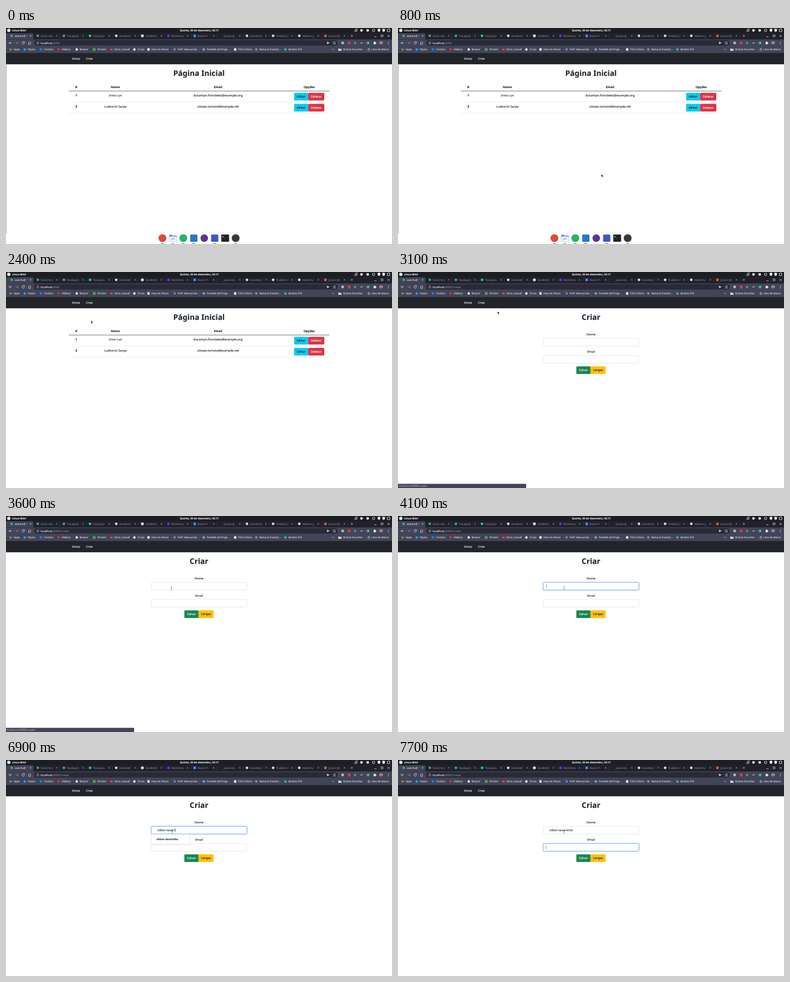
Write an HTML page that moves like this. It is 690 by 388 pixels and loops after 8 s.

```html
<!DOCTYPE html>
<html lang="pt-BR">
<head>
<meta charset="utf-8">
<title>Página Inicial</title>
<style>
html, body { margin: 0; width: 100%; height: 100%; overflow: hidden; background: #fff; }
svg { display: block; width: 100vw; height: 100vh; }
text { font-family: "Noto Sans", "Open Sans", sans-serif; white-space: pre; text-rendering: geometricPrecision; }
</style>
</head>
<body>
<svg id="stage" viewBox="0 0 690 388"></svg>
<script>
const NS = "http://www.w3.org/2000/svg";
const stage = document.getElementById("stage");
const LOOP = 8000;

function el(parent, tag, attrs = {}) {
  const node = document.createElementNS(NS, tag);
  for (const k in attrs) node.setAttribute(k, attrs[k]);
  parent.appendChild(node);
  return node;
}
const group = parent => el(parent, "g");
const rect = (g, x, y, width, height, fill, rx = 0, more = {}) =>
  el(g, "rect", { x, y, width, height, fill, rx, ...more });
const dot = (g, cx, cy, r, fill, more = {}) => el(g, "circle", { cx, cy, r, fill, ...more });
const line = (g, d, stroke, width = 0.7) =>
  el(g, "path", { d, stroke, "stroke-width": width, fill: "none" });
function text(g, str, x, y, size, fill, more = {}) {
  const node = el(g, "text", {
    x, y, "font-size": size, fill, stroke: fill, "stroke-width": 0.1, ...more
  });
  node.textContent = str;
  return node;
}
const MID = { "text-anchor": "middle" };
const BOLD = { "font-weight": 700 };
const show = (node, on) => node.setAttribute("visibility", on ? "visible" : "hidden");
const clamp = v => Math.max(0, Math.min(1, v));

const INK = "#212529", PALE = "#dcdde4", BAR = "#424458", BODY = 5.55;

rect(stage, 0, 0, 690, 388, "#fff");

// Desktop panel
function drawPanel() {
  const g = group(stage);
  rect(g, 0, 0, 690, 9, "#1d1e24");
  dot(g, 5, 4.3, 3, "#e2e2e2");
  text(g, "Linux Mint", 11, 6.1, 4.65, "#eee", BOLD);
  text(g, "Quinta, 30 de dezembro, 02:17", 345.5, 6.1, 4.65, "#eee", { ...MID, ...BOLD });
  line(g, "M624.5 5.8V2.3l3-.7v3.6", "#eee", 0.8);
  dot(g, 624, 5.9, 0.9, "#eee");
  dot(g, 627, 5.3, 0.9, "#eee");
  dot(g, 635.5, 4.3, 2.4, "#eee");
  dot(g, 646.5, 4.3, 2.4, "#eee");
  dot(g, 657, 4.3, 2.2, "none", { stroke: "#eee", "stroke-width": 0.9 });
  el(g, "path", { d: "M664.4 1.8l2.3-.6 2.3.6v2.4q0 2-2.3 3-2.3-1-2.3-3z", fill: "#eee" });
  el(g, "path", { d: "M672.8 1.8l2.3-.6 2.3.6v2.4q0 2-2.3 3-2.3-1-2.3-3z", fill: "#eee" });
  rect(g, 681.4, 2, 4.6, 4.6, "none", 0.8, { stroke: "#eee", "stroke-width": 0.9 });
}

function drawTabs() {
  const g = group(stage);
  const green = "#3da778", white = "#d6d6da";
  const tabs = [
    ["vue-crud -", green], ["Event Han", green], ["Navegaçã", green], ["Papagaio", "#25d366"],
    ["localhost:", white], ["Incidente", white], ["Bootstrap", "#7620d8"], ["Buscor T", "#4285f4"],
    ["Javascrip", ""], ["conversor", white], ["Trabalho r", white], ["redirect y", white],
    ["javascript", "#c65a30"]
  ];
  rect(g, 0, 9, 690, 12, "#20212b");
  el(g, "path", { d: "M0 20.5V11.5q0-2 2-2H47q2 0 2 2V20.5z", fill: BAR });
  tabs.forEach(([name, color], i) => {
    const x = 10 + i * 46.75, on = i === 0;
    if (color) {
      if (i === 5 || i === 6 || i === 7 || i === 12) rect(g, x - 2.4, 11.7, 4.8, 4.8, color, 0.6);
      else dot(g, x, 14.1, 2.4, color);
    }
    text(g, name, x + 5.5, 15.9, 4.6, on ? "#e6e7ec" : "#7d7e88");
    const c = x + 34;
    line(g, `M${c - 1.3} 12.8l2.6 2.6m0-2.6l-2.6 2.6`, on ? "#eee" : "#b4b5bc", 0.6);
    if (!on) line(g, `M${x + 40} 12v5`, "#50515c", 0.4);
  });
  line(g, "M616 14.1h4.4m-2.2-2.2v4.4", "#ccc", 0.6);
  line(g, "M658.5 15.8h4M682 12.5l3.6 3.6m0-3.6l-3.6 3.6", "#ddd", 0.8);
  rect(g, 670.5, 12.5, 3.4, 3.4, "none", 0, { stroke: "#ddd", "stroke-width": 0.7 });
}

let urlPath;
function drawToolbar() {
  const g = group(stage);
  rect(g, 0, 20.5, 690, 24.6, BAR);
  rect(g, 50, 22, 543, 9.6, "#282a36", 4.8);
  line(g, "M10.5 26.8h-5m2.2-2.2l-2.2 2.2 2.2 2.2", PALE, 0.8);
  line(g, "M17 26.8h5m-2.2-2.2l2.2 2.2-2.2 2.2", "#8a8b98", 0.8);
  line(g, "M32.7 25.2a2.3 2.3 0 1 0 .5 2.2m-.2-3.4v1.8h-1.8", PALE, 0.8);
  line(g, "M39.7 26.8l2.5-2.4 2.5 2.4m-4.2-.5v3h3.4v-3", PALE, 0.8);
  dot(g, 56.8, 26.8, 2.1, "none", { stroke: "#ccc", "stroke-width": 0.6 });
  line(g, "M56.8 26.4v1.6m0-2.6v.5", "#ccc", 0.6);
  const url = text(g, "localhost", 62, 28.6, 5, "#eceef2");
  urlPath = el(url, "tspan", { fill: "#9a9ca6", stroke: "none" });
  el(g, "path", { d: "M573.5 24.5l5 2.3-5 2.3.6-2.3z", fill: "#ddd" });
  el(g, "path", {
    d: "M587 24.1l.8 1.8 1.9.2-1.4 1.3.4 1.9-1.7-1-1.7 1 .4-1.9-1.4-1.3 1.9-.2z",
    fill: "none", stroke: "#ddd", "stroke-width": 0.6
  });
  rect(g, 599.5, 24.5, 4.6, 4.6, "#b3b4be", 1);
  rect(g, 611, 24.3, 4.8, 5, "#d23f3f", 1);
  dot(g, 624, 26.8, 2.2, "#777986");
  rect(g, 633, 25.8, 5.2, 2, "#8f909c", 1);
  dot(g, 647.3, 26.8, 2.5, "#41b883");
  rect(g, 657, 25.2, 4, 4, PALE, 0.6);
  dot(g, 659, 24.9, 1, PALE);
  dot(g, 661.2, 27, 1, PALE);
  dot(g, 670.5, 26.8, 3.1, "#b79a86");
  el(g, "path", { d: "M668.4 29.1q2.1-3 4.2 0a3.1 3.1 0 0 1-4.2 0z", fill: "#555a66" });
  dot(g, 670.5, 26, 1.1, "#555a66");
  [24.9, 26.8, 28.7].forEach(y => dot(g, 683.5, y, 0.6, PALE));

  const marks = [
    [14, "Apps", ""], [39, "Pipilar", "#1da1f2"], [68, "Cartazo", "#1f7fd6"],
    [99.5, "Videlux", "#e02f2f"], [132, "Buscor", "#e4e4e6"], [163, "Torrent", "#4caf50"],
    [194, "Docs Laravel", "#e5432f"], [235, "Curso", "#e4e4e6"], [260, "Area do Aluno", "#e4e4e6"],
    [307, "PHP: Manual do...", "#7479b8"], [359, "Padrões de Proje...", "#7ea3c8"],
    [415, "CSS Codoro", "#e4e4e6"], [453, "Remova Fundos...", "#8b8c98"],
    [505, "Bordas CSS", "#2fb6a0"]
  ];
  marks.forEach(([x, name, color], i) => {
    if (color) {
      if (i % 3 === 2) rect(g, x - 7.5, 36.3, 4.4, 4.4, color, 0.5);
      else dot(g, x - 5.5, 38.5, 2.2, color);
    }
    text(g, name, x, 40.2, 4.6, PALE);
  });
  ["#e05a4a", "#e6b93c", "#4aa564"].forEach((c, i) =>
    [0, 1, 2].forEach(j => rect(g, 6 + j * 1.7, 36.2 + i * 1.7, 1.2, 1.2, c)));
  text(g, "»", 583.5, 40.2, 5, PALE);
  el(g, "path", { d: "M594 36.7h2l.8.8h3v3.4H594z", fill: "#d0d1d8" });
  text(g, "Outros favoritos", 602.5, 40.2, 4.6, PALE);
  line(g, "M643.5 36v5", "#666878", 0.4);
  line(g, "M646.5 36.8h4M646.5 38.6h4M646.5 40.4h4", PALE, 0.7);
  text(g, "Lista de leitura", 653, 40.2, 4.6, PALE);
}

function drawNav() {
  rect(stage, 0, 45, 690, 20.2, INK);
  text(stage, "Inicio", 118, 57.4, BODY, "#fff");
  text(stage, "Criar", 143, 57.4, BODY, "#fff");
}

const heading = (g, str) =>
  text(g, str, 345, 86, 13.6, INK, { ...MID, "font-weight": 600 });

function button(g, label, x, y, w, fill, color) {
  rect(g, x, y, w, 13.7, fill, 1.5);
  text(g, label, x + w / 2, y + 8.8, BODY, color, MID);
}

function drawHome() {
  const g = group(stage);
  const cols = [125.5, 195.5, 379, 542];
  heading(g, "Página Inicial");
  ["#", "Nome", "Email", "Opções"].forEach((s, i) =>
    text(g, s, cols[i], 108, 5.5, INK, { ...MID, ...BOLD }));
  line(g, "M112 113.2H578", "#30343a", 0.7);
  [
    ["1", "Irina Lux", "docampo.florisbela@example.org"],
    ["3", "Ludovino Sarpa", "ulisses.tamoio@example.net"]
  ].forEach((row, r) => {
    const y = r * 19.8;
    row.forEach((s, i) =>
      text(g, s, cols[i], 122.8 + y, BODY, INK, i ? MID : { ...MID, ...BOLD }));
    button(g, "Editar", 515, 116.5 + y, 25.4, "#0dcaf0", "#111");
    button(g, "Deletar", 540.2, 116.5 + y, 28.8, "#dc3545", "#fff");
    line(g, `M112 ${133.1 + y}H578`, "#dee2e6", 0.5);
  });
  return g;
}

function field(g, y) {
  const ring = rect(g, 258.6, y - 1, 173, 15.7, "#b9d5fe", 2.4);
  rect(g, 259.6, y, 171, 13.7, "#fff", 1.5, { stroke: "#ced4da", "stroke-width": 0.5 });
  const edge = rect(g, 259.6, y, 171, 13.7, "none", 1.5, { stroke: "#6ba6fb", "stroke-width": 0.7 });
  return level => [ring, edge].forEach(n => n.setAttribute("opacity", level));
}

const FULL = "nilton tavarinho";
const OPTIONS = ["  " + FULL, FULL, "tavinho", "teste", "teste 2", "valdino"];

function drawCreate() {
  const g = group(stage);
  heading(g, "Criar");
  text(g, "Nome", 345, 114.1, BODY, INK, MID);
  const focusName = field(g, 119.2);
  text(g, "Email", 345, 144.8, BODY, INK, MID);
  const focusMail = field(g, 150);
  button(g, "Salvar", 318.8, 169.6, 25.6, "#198754", "#fff");
  button(g, "Limpar", 344.4, 169.6, 26.8, "#ffc107", "#111");
  const typed = text(g, "", 270.8, 128, BODY, INK);
  const caret = rect(g, 265, 123, 0.5, 6.2, "#222");

  const list = group(g);
  const shade = rect(list, 259.3, 133.6, 69.8, 45, "#000", 1, { opacity: 0.13 });
  const sheet = rect(list, 259.6, 133.4, 69, 45, "#fff", 1, { stroke: "#d4d6da", "stroke-width": 0.4 });
  const items = OPTIONS.map((s, i) =>
    text(list, s.trim(), 269, 144.4 + i * 13, 4.75, "#2c2e33", { "font-weight": 600 }));

  function setList(count, indent) {
    show(list, count > 0);
    shade.setAttribute("height", count * 13 + 5.8);
    sheet.setAttribute("height", count * 13 + 5.2);
    items[0].setAttribute("x", indent ? 275 : 269);
    items.forEach((n, i) => n.setAttribute("display", i < count ? "inline" : "none"));
  }
  return { g, focusName, focusMail, typed, caret, setList };
}

function drawDock() {
  const g = group(stage);
  const y = 377.5, x = i => 279.6 + i * 18.7;
  dot(g, x(0), y, 7, "#e04a3a");
  el(g, "path", { d: "M291.5 371.5h5l1.5 1.6h7.5v10.4h-14z", fill: "#5b8fd8" });
  rect(g, 291.5, 374.5, 14, 9.3, "#eef2f8", 1, { stroke: "#b4c3da", "stroke-width": 0.4 });
  rect(g, 295, 378, 7, 1.4, "#7aa5e2");
  dot(g, x(2), y, 7, "#27b268");
  rect(g, x(3) - 6.5, y - 6.5, 13, 13, "#2678c4", 1.5);
  dot(g, x(4), y, 6.7, "#5a3590");
  rect(g, x(5) - 6.5, y - 6.5, 13, 13, "#4059c0", 2);
  rect(g, x(6) - 7, y - 6.5, 14, 13, "#202124", 1, { stroke: "#888", "stroke-width": 0.5 });
  text(g, ">_", x(6) - 5, y - 0.5, 5, "#fff", BOLD);
  dot(g, x(7), y, 7, "#37383c");
  [0, 1, 2, 3, 5, 7].forEach(i => rect(g, x(i) - 2.5, 386.7, 5, 1.3, "#5a91d8", 0.5));
  return g;
}

drawPanel();
drawTabs();
drawToolbar();
drawNav();
const home = drawHome();
const form = drawCreate();
const sideEdge = rect(stage, 0, 65.2, 0.9, 304, "#a5a7ab");
const dock = drawDock();

const status = group(stage);
rect(status, -1, 380.4, 230, 9, BAR, 1);
text(status, "localhost:8080/create", 1.8, 385.9, 5, "#a3a4ae");

const mouse = group(stage);
const arrow = el(mouse, "path", {
  d: "M0 0v5l1.2-1.1.8 1.8.9-.4-.8-1.7h1.6z", fill: "#111", stroke: "#fff", "stroke-width": 0.35
});
const hand = el(mouse, "path", {
  d: "M0 0q.6-.4.9.2v2l2 .5q.7.3.5 1l-.5 2H.2L-1.2 3.6q.4-.7 1.2 0z",
  fill: "#fff", stroke: "#111", "stroke-width": 0.5
});
const beam = line(mouse, "M-1.1 -2.7h2.2M-1.1 2.7h2.2M0 -2.7v5.4", "#444", 0.5);

// time, x, y
const PATH = [
  [0, 410, 392], [900, 362, 258], [1700, 286.4, 120.6], [1800, 286.4, 120.6],
  [2400, 152, 87.3], [2700, 149, 56], [2900, 149, 56], [3600, 295.5, 130.2], [4000, 297, 129]
];
function mouseAt(t) {
  let i = 1;
  while (i < PATH.length && PATH[i][0] < t) i++;
  if (i === PATH.length) return PATH[i - 1].slice(1);
  const [t0, x0, y0] = PATH[i - 1], [t1, x1, y1] = PATH[i];
  const p = clamp((t - t0) / (t1 - t0)), k = p * p * (3 - 2 * p);
  return [x0 + (x1 - x0) * k, y0 + (y1 - y0) * k];
}

const KEYS = [5400, 5500, 5600, 5700, 5800, 6000, 6100, 6300, 6400, 6500,
  6700, 6800, 6900, 7000, 7200, 7200];
const CLICK = 2900, FOCUS = 3900, OPEN = 4500, INDENT = 5200, CLOSE = 7400, TAB = 7500;

function render(now) {
  const t = Math.floor(now / 100) * 100 % LOOP;
  const created = t >= CLICK;
  show(home, !created);
  form.g.setAttribute("display", created ? "inline" : "none");
  urlPath.textContent = created ? ":8080/create" : ":8080";

  const slide = clamp((t - 1800) / 400);
  dock.setAttribute("transform", `translate(0 ${slide * 22})`);
  show(dock, slide < 1);
  show(sideEdge, slide < 1);
  show(status, t >= 2700 && t < 3700);

  const [mx, my] = mouseAt(t);
  mouse.setAttribute("transform", `translate(${mx} ${my})`);
  const overLink = my > 51 && my < 60;
  const overField = created && my > 119 && mx > 259;
  show(hand, overLink);
  show(beam, overField);
  show(arrow, !overLink && !overField);

  if (!created) return;
  const inMail = t >= TAB;
  const mail = clamp((t - TAB + 50) / 150);
  form.focusMail(mail);
  form.focusName(clamp((t - FOCUS + 50) / 150) * (1 - mail));

  const count = KEYS.filter(k => k <= t).length;
  form.typed.textContent = FULL.slice(0, count);
  const start = t < OPEN ? 265 : t < INDENT ? 266.4 : 270.6;
  const end = count ? 270.8 + form.typed.getComputedTextLength() : start;
  form.caret.setAttribute("x", inMail ? 264.6 : end);
  form.caret.setAttribute("y", inMail ? 153.8 : 123);
  form.caret.setAttribute("opacity", t >= FOCUS ? 1 : 0);

  const rows = t < OPEN || t >= CLOSE ? 0 : t < INDENT ? 6 : count ? 1 : 3;
  form.setList(rows, rows > 1);
}

function tick() {
  render(performance.now());
  requestAnimationFrame(tick);
}
tick();
</script>
</body>
</html>
```
